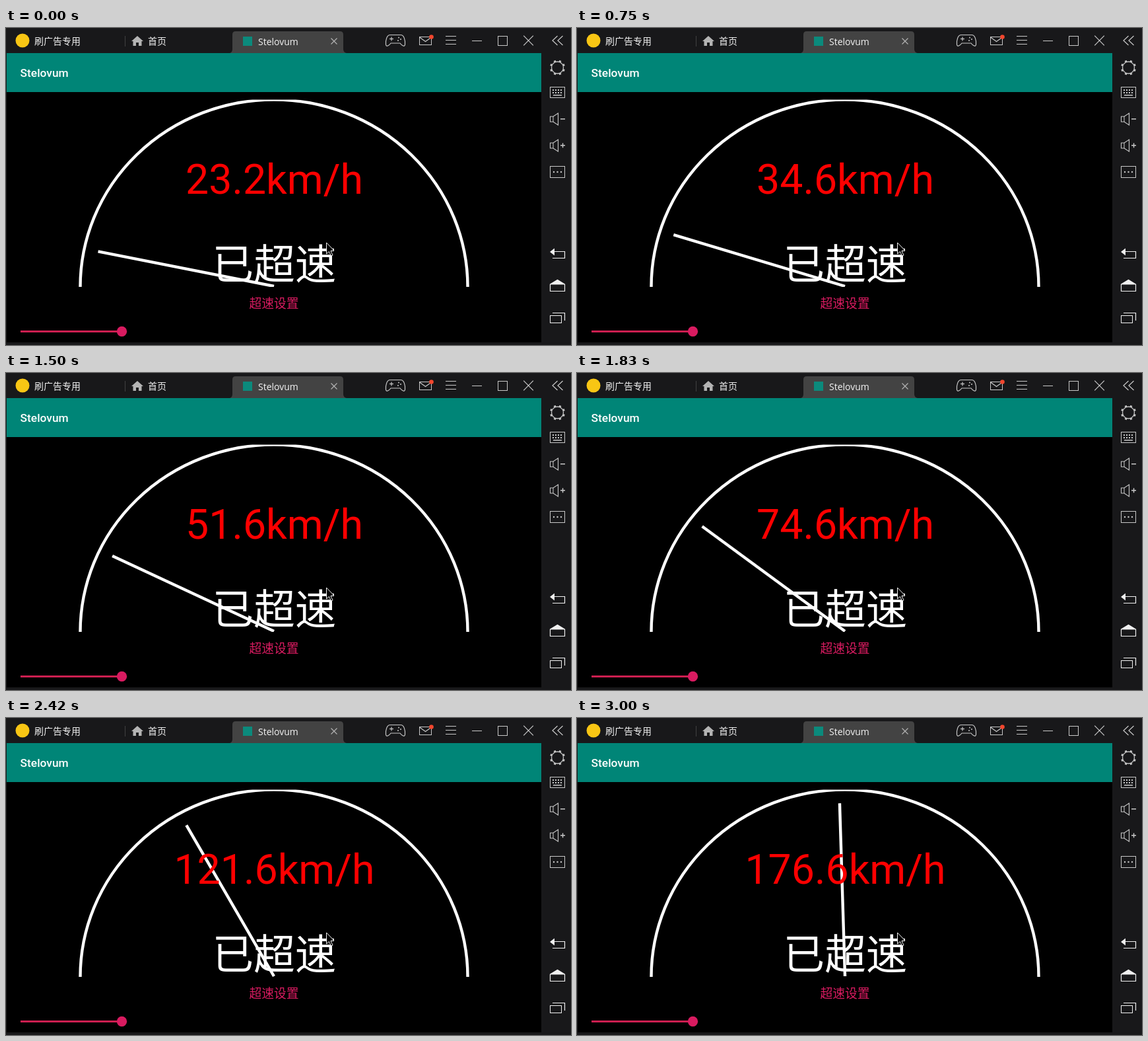
Write an HTML page with a canvas that moves like this. It is 856 by 480 pixels and loops after 3080 ms.

```html
<!DOCTYPE html>
<html lang="zh-CN">
<head>
<meta charset="utf-8">
<title>Speedometer</title>
<style>
html, body { margin: 0; width: 100%; height: 100%; overflow: hidden; background: #18181a; }
canvas { display: block; width: 856px; height: 480px; }
</style>
</head>
<body>
<canvas id="stage" width="856" height="480"></canvas>
<script>
const ctx = document.getElementById('stage').getContext('2d');
const LOOP = 3080;
const APP = 'Stelovum';
const CJK = '"Noto Sans CJK SC", "Noto Sans CJK", sans-serif';
const BAR = '#18181a';
const ICON = '#c8c8c8';
const WHITE = '#ffffff';
const ACCENT = '#d81b60';
const hub = { x: 406, y: 391 };

// Speed readings as [tick, km/h]; twelve ticks per second.
const readings = [[0, 23.2], [6, 30.8], [13, 40.2], [18, 51.6], [26, 103.6], [32, 141.2], [36, 176.6]];
const rates = readings.slice(1).map(([x, y], i) => (y - readings[i][1]) / (x - readings[i][0]));
const slopes = readings.map((_, i) => {
  const a = rates[i - 1] ?? rates[i], b = rates[i] ?? a;
  return 2 * a * b / (a + b);
});

function speedAt(tick) {
  let i = 0;
  while (i < rates.length - 1 && tick >= readings[i + 1][0]) i++;
  const [x0, y0] = readings[i], [x1, y1] = readings[i + 1];
  const w = x1 - x0, u = (tick - x0) / w, v = 1 - u;
  const y = v * v * (1 + 2 * u) * y0 + u * u * (3 - 2 * u) * y1
    + w * u * v * (v * slopes[i] - u * slopes[i + 1]);
  return Math.round(y * 5) / 5;
}

function rect(x, y, w, h, color) {
  ctx.fillStyle = color;
  ctx.fillRect(x, y, w, h);
}

function box(x, y, w, h, color = ICON) {
  ctx.strokeStyle = color;
  ctx.lineWidth = 1;
  ctx.strokeRect(x + .5, y + .5, w, h);
}

function trace(points, close) {
  ctx.beginPath();
  for (let i = 0; i < points.length; i += 2) ctx.lineTo(points[i], points[i + 1]);
  if (close) ctx.closePath();
}

function line(points, color = ICON, width = 1.2, close = false) {
  trace(points, close);
  ctx.strokeStyle = color;
  ctx.lineWidth = width;
  ctx.stroke();
}

function fill(points, color = ICON) {
  trace(points, true);
  ctx.fillStyle = color;
  ctx.fill();
}

function dot(x, y, r, color = ICON) {
  ctx.beginPath();
  ctx.arc(x, y, r, 0, Math.PI * 2);
  ctx.fillStyle = color;
  ctx.fill();
}

function text(str, x, y, font, color, align = 'left') {
  ctx.font = font;
  ctx.fillStyle = color;
  ctx.textAlign = align;
  ctx.fillText(str, x, y);
}

function cross(x, y, r, color = ICON) {
  line([x - r, y - r, x + r, y + r], color);
  line([x + r, y - r, x - r, y + r], color);
}

function gamepad() {
  ctx.beginPath();
  ctx.moveTo(582, 10.5);
  ctx.lineTo(598, 10.5);
  ctx.bezierCurveTo(603, 10.5, 605, 18, 604.5, 25);
  ctx.bezierCurveTo(604, 29, 600, 27, 597, 23);
  ctx.lineTo(583, 23);
  ctx.bezierCurveTo(580, 27, 576, 29, 575.5, 25);
  ctx.bezierCurveTo(575, 18, 577, 10.5, 582, 10.5);
  ctx.strokeStyle = ICON;
  ctx.lineWidth = 1.2;
  ctx.stroke();
  line([581, 16.5, 587, 16.5]);
  line([584, 13.5, 584, 19.5]);
  dot(595, 14.5, 1);
  dot(598, 17, 1);
  dot(594, 19, 1);
}

function topBar() {
  dot(25, 19, 10.5, '#f8c614');
  text('刷广告专用', 43, 24.5, '14px ' + CJK, '#f0f0f0');
  rect(180, 12, 1, 16, '#404040');
  fill([199, 12, 208, 20, 205.5, 20, 205.5, 27, 201, 27, 201, 22, 197, 22, 197, 27, 192.5, 27, 192.5, 20, 190, 20], '#b4b4b4');
  text('首页', 215, 25, '14px ' + CJK, '#f0f0f0');

  ctx.beginPath();
  ctx.moveTo(339, 38);
  ctx.quadraticCurveTo(343, 37, 343, 32);
  ctx.lineTo(343, 10);
  ctx.quadraticCurveTo(343, 5, 348, 5);
  ctx.lineTo(506, 5);
  ctx.quadraticCurveTo(511, 5, 511, 10);
  ctx.lineTo(511, 32);
  ctx.quadraticCurveTo(511, 37, 516, 38);
  ctx.fillStyle = '#434343';
  ctx.fill();
  rect(359, 13, 14, 14, '#0b8a7c');
  text(APP, 382, 25.5, '14px "Open Sans", "Noto Sans", sans-serif', '#f5f5f5');
  cross(497, 20, 4.5, '#b0b0b0');

  gamepad();
  box(626, 13, 18, 12);
  line([626.5, 14, 635.5, 20.5, 644.5, 14]);
  dot(644.5, 13.5, 3.3, '#f4472e');
  for (const y of [13, 19, 25]) rect(666, y - 1, 16, 1, ICON);
  rect(706, 19, 15, 1, ICON);
  box(745, 12, 14, 14);
  cross(791.5, 19, 7.3);
  for (const x of [828, 836]) line([x + 7.5, 12, x, 19, x + 7.5, 26]);
}

function speaker(y, plus) {
  line([824.5, y - 4, 829, y - 4, 836.5, y - 9, 836.5, y + 9, 829, y + 4, 824.5, y + 4], ICON, 1.1, true);
  line([829, y - 4, 829, y + 4], ICON, 1);
  rect(840, y - 1, 7, 1.5, ICON);
  if (plus) rect(842.8, y - 3.7, 1.5, 7, ICON);
}

function sideBar() {
  ctx.beginPath();
  ctx.arc(835.5, 60, 9, 0, Math.PI * 2);
  ctx.strokeStyle = ICON;
  ctx.lineWidth = 1.3;
  ctx.stroke();
  for (let i = 0; i < 8; i++) {
    const a = (i + .5) * Math.PI / 4, c = Math.cos(a), s = Math.sin(a);
    line([835.5 + c * 9, 60 + s * 9, 835.5 + c * 11.5, 60 + s * 11.5], ICON, 3.2);
  }

  box(824, 89, 22, 16);
  for (const y of [93, 97]) {
    for (let x = 828; x < 844; x += 4) rect(x, y, 2, 2, ICON);
  }
  rect(829, 101, 13, 1.5, ICON);
  speaker(138, false);
  speaker(178, true);
  box(824, 209, 22, 17);
  for (const x of [830, 835.5, 841]) dot(x, 218, 1.2);

  const nav = '#f0f0f0';
  fill([824, 339, 831, 333.5, 831, 344.5], nav);
  line([830, 338.5, 846.5, 338.5, 846.5, 348.5, 828, 348.5], nav);
  line([824.5, 388, 835.5, 381.5, 846.5, 388, 846.5, 398.5, 824.5, 398.5], nav, 1.2, true);
  fill([824, 388.5, 835.5, 381, 847, 388.5], nav);
  box(824, 435, 17, 11, nav);
  line([828, 431.5, 846.5, 431.5, 846.5, 443], nav);
}

function gauge(speed) {
  ctx.save();
  ctx.beginPath();
  ctx.rect(1, 108.5, 810, 283.5);
  ctx.clip();
  ctx.beginPath();
  ctx.ellipse(hub.x, hub.y + 1, 293.5, 283.5, 0, Math.PI, Math.PI * 2);
  ctx.strokeStyle = WHITE;
  ctx.lineWidth = 4.4;
  ctx.stroke();
  const angle = speed * Math.PI / 360;
  line([hub.x, hub.y, hub.x - 272 * Math.cos(angle), hub.y - 262 * Math.sin(angle)], WHITE, 4.4);
  ctx.restore();

  text(speed.toFixed(1) + 'km/h', hub.x + .5, 250.5, '62.6px Roboto, sans-serif', '#ff0000', 'center');
  text('已超速', hub.x + .5, 379.5, '62.6px ' + CJK, WHITE, 'center');
  text('超速设置', hub.x, 423.5, '18.8px ' + CJK, ACCENT, 'center');
}

function draw(speed) {
  rect(0, 0, 856, 480, BAR);
  rect(1, 97, 810, 379, '#000000');
  rect(1, 38, 810, 59, '#008577');
  topBar();
  sideBar();
  text(APP, 21.5, 73.5, '500 17.4px Roboto, sans-serif', WHITE);
  gauge(speed);
  rect(22, 458, 153, 3, '#cc1f50');
  dot(175.5, 459.5, 7.7, ACCENT);

  const cursor = [485.5, 325, 485.5, 342, 489.5, 338.5, 492.5, 345, 495, 344, 492, 337.5, 497, 337];
  fill(cursor, '#000000');
  line(cursor, '#f4f4f4', 1, true);
}

function play(now) {
  // Ticks begin on whole hundredths of a second.
  const hundredths = Math.floor((now % LOOP) / 10);
  const tick = Math.ceil((hundredths + 1) * 3 / 25) - 1;
  draw(speedAt(Math.min(tick, 36)));
  requestAnimationFrame(play);
}

play(0);
</script>
</body>
</html>
```
